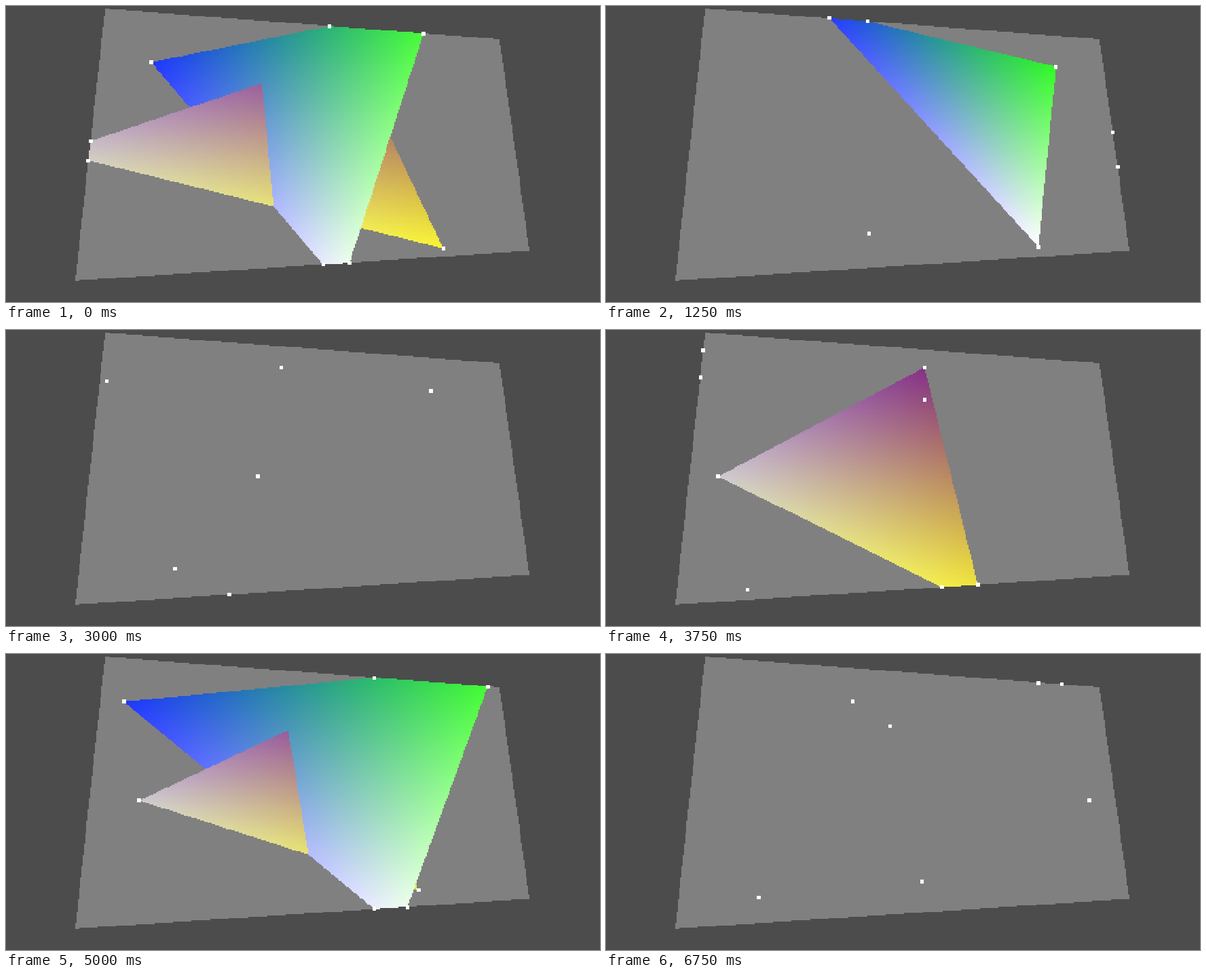
These frames come from a looping animation (875x437 px, 7250 ms). An HTML page with a canvas:

```html
<!DOCTYPE html>
<html lang="en">
<head>
<meta charset="utf-8">
<title>Clipped triangles</title>
<style>
html, body { margin: 0; width: 100%; height: 100%; overflow: hidden; background: #4c4c4c; }
canvas { display: block; width: 875px; height: 437px; image-rendering: pixelated; }
</style>
</head>
<body>
<canvas id="view" width="480" height="240"></canvas>
<script>
const W = 480, H = 240, SX = W / 875, SY = H / 437;
const LOOP = 7250, FOCAL = 875, DEPTH = 5.885, CX = 436, CY = 216.3;
const starts = [0, 500, 1250, 1750, 2500, 3000, 3750, 4250, 5000, 5500, 6250, 6750];
const turns = [0, 47.2, 94.2, 141.4, 188.6, 236, 283, 330.2, 378.6, 423.8, 471.6, 519.1];
const START_TURN = -78.6;

const pane = [[146, 4], [727, 49], [771, 361.5], [102, 405.5]].map(([x, y]) => ({ x: x * SX, y: y * SY }));

const vertex = (x, y, z, color) => ({ x, y, z, color });
const triangles = [
  [vertex(1.5, 0, -2, [207, 203, 208]), vertex(0, 1, 0.5, [132, 48, 134]), vertex(0, -1, 1.5, [250, 244, 52])],
  [vertex(-1, 1, -1.5, [30, 54, 255]), vertex(2, 1, 0.5, [50, 252, 34]), vertex(1.5, -1, 0, [255, 255, 255])]
];

const ctx = document.getElementById('view').getContext('2d');
const image = ctx.createImageData(W, H);
const pixels = new Uint32Array(image.data.buffer);
const depth = new Float32Array(W * H);
const rgb = (r, g, b) => (255 << 24 | b << 16 | g << 8 | r) >>> 0;

// Positive when p lies to the right of a -> b, with y pointing down.
const side = (a, b, p) => (b.x - a.x) * (p.y - a.y) - (b.y - a.y) * (p.x - a.x);
const inPane = p => pane.every((a, i) => side(a, pane[(i + 1) % 4], p) >= 0);

function project(v, angle) {
  const c = Math.cos(angle), s = Math.sin(angle);
  const w = 1 / (DEPTH + v.x * s + v.z * c);
  return {
    x: (CX + FOCAL * (v.x * c - v.z * s) * w) * SX,
    y: (CY - FOCAL * v.y * w) * SY,
    w, color: v.color
  };
}

function clip(poly) {
  pane.forEach((a, i) => {
    const b = pane[(i + 1) % 4], out = [];
    poly.forEach((p, j) => {
      const q = poly[(j + 1) % poly.length];
      const dp = side(a, b, p), dq = side(a, b, q);
      if (dp >= 0) out.push(p);
      if (dp >= 0 !== dq >= 0) {
        const t = dp / (dp - dq);
        out.push({ x: p.x + (q.x - p.x) * t, y: p.y + (q.y - p.y) * t });
      }
    });
    poly = out;
  });
  return poly;
}

function fill([a, b, c]) {
  const area = side(a, b, c);
  if (area <= 0) return;
  const xs = [a.x, b.x, c.x], ys = [a.y, b.y, c.y];
  const x0 = Math.max(0, Math.floor(Math.min(...xs))), x1 = Math.min(W - 1, Math.ceil(Math.max(...xs)));
  const y0 = Math.max(0, Math.floor(Math.min(...ys))), y1 = Math.min(H - 1, Math.ceil(Math.max(...ys)));
  for (let y = y0; y <= y1; y++) {
    for (let x = x0; x <= x1; x++) {
      const p = { x: x + 0.5, y: y + 0.5 };
      const u = side(b, c, p) / area, v = side(c, a, p) / area, t = 1 - u - v;
      if (u < 0 || v < 0 || t < 0 || !inPane(p)) continue;
      const w = u * a.w + v * b.w + t * c.w, i = y * W + x;
      if (w <= depth[i]) continue;
      depth[i] = w;
      const mix = k => Math.round(u * a.color[k] + v * b.color[k] + t * c.color[k]);
      pixels[i] = rgb(mix(0), mix(1), mix(2));
    }
  }
}

function mark(p) {
  const px = Math.floor(p.x), py = Math.floor(p.y);
  for (let y = py - 1; y <= py + 1; y++) {
    for (let x = px - 1; x <= px + 1; x++) {
      if (x >= 0 && y >= 0 && x < W && y < H) pixels[y * W + x] = rgb(255, 255, 255);
    }
  }
}

const backdrop = new Uint32Array(W * H).map((_, i) =>
  inPane({ x: i % W + 0.5, y: Math.floor(i / W) + 0.5 }) ? rgb(128, 128, 128) : rgb(76, 76, 76));

function draw(turn) {
  pixels.set(backdrop);
  depth.fill(0);
  const angle = (START_TURN + turn) * Math.PI / 180;
  for (const tri of triangles) {
    const flat = tri.map(v => project(v, angle));
    fill(flat);
    clip(flat).forEach(mark);
  }
  ctx.putImageData(image, 0, 0);
}

let shown = -1;
function tick() {
  const time = performance.now() % LOOP;
  const step = starts.filter(s => s <= time).length - 1;
  if (step !== shown) draw(turns[shown = step]);
  requestAnimationFrame(tick);
}
tick();
</script>
</body>
</html>
```
